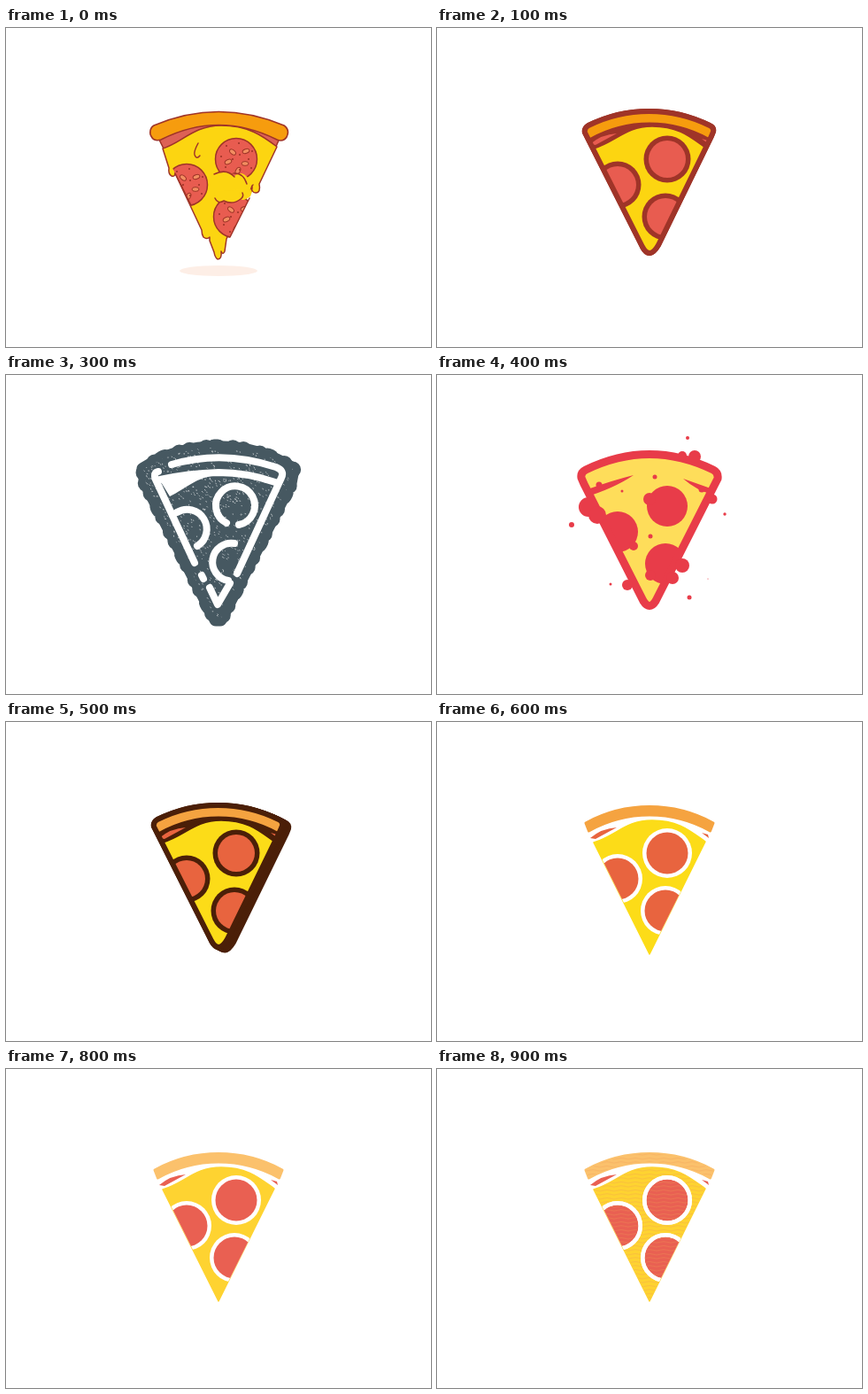
An HTML page for the animation above (1000 ms loop, 480 by 360 pixels).

```html
<!DOCTYPE html>
<html lang="en">
<head>
<meta charset="utf-8">
<title>Pizza slices</title>
<style>
  html, body { margin: 0; width: 100%; height: 100%; overflow: hidden; background: #fff; }
  svg { display: block; width: 100%; height: 100%; }
  .look { opacity: 0; }
</style>
</head>
<body>
<svg id="stage" viewBox="0 0 480 360"></svg>
<script>
const STEP = 100, COUNT = 10;

// Shared geometry
const CRUST = 'M168 114A150 150 0 0 1 312 114L308.5 123A140 140 0 0 0 171.5 123Z';
const CHEESE = 'M177 136C203 128 213 111 243 111S286 123 303 135L240 262Z';
const WEDGE = 'M168 118H312L240 262Z';
const SLIVERS = 'M173 131Q186 120 203 119L179 132ZM299 125L306 127L307 131Z';
const BOLD = 'M169 122L167 118Q166 113 171 110A154 154 0 0 1 308 110Q313 112 312 117L310 122L250 245Q240 262 232 247Z';
const SOFT = 'M166 123L163 116Q162 110 168 107Q240 72 312 107Q318 110 317 117L247 255Q240 266 233 255Z';
const BOARD = 'M170 119Q167 110 175 107Q240 86 305 107Q313 110 310 119L249 241Q240 252 231 241Z';
const STAMP = 'M158 122L155 106A159 159 0 0 1 324 106L321 122L242 276H237Z';
const MEAT = [[260, 148], [204, 177], [258, 213]];

const path = (d, a = '') => `<path d="${d}" ${a}/>`;
const disc = (x, y, r, a = '') => `<circle cx="${x}" cy="${y}" r="${r}" ${a}/>`;
const line = (color, w) => `fill="none" stroke="${color}" stroke-width="${w}" stroke-linecap="round" stroke-linejoin="round"`;
const fill = color => `fill="${color}"`;
const group = (a, ...parts) => `<g ${a}>${parts.join('')}</g>`;
const clip = (id, ...parts) => group(`clip-path="url(#${id})"`, ...parts);
const meats = (r, a) => MEAT.map(([x, y]) => disc(x, y, r, a)).join('');

function random(seed) {
  return () => (seed = (seed * 16807) % 2147483647) / 2147483647;
}

function specks(count, seed, x, y, w, h, size) {
  const rnd = random(seed);
  let d = '';
  for (let i = 0; i < count; i++) {
    d += `M${(x + rnd() * w).toFixed(1)} ${(y + rnd() * h).toFixed(1)}l${(rnd() * size).toFixed(1)} ${(rnd() * size).toFixed(1)}`;
  }
  return d;
}

// Flat slice: crust, cheese and meat parted by a gap colour
function flat({ crust, cheese, meat, gap = '#fff', edge = cheese, r = 23.5, ring = 28 }) {
  return path(CRUST, `fill="${crust}" stroke="${crust}" stroke-width="3" stroke-linejoin="round"`) +
    path(SLIVERS, fill(meat)) +
    path(CHEESE, `fill="${cheese}" stroke="${edge}" stroke-width="1.5" stroke-linejoin="round"`) +
    clip('wedge', meats(ring, fill(gap)), meats(r, fill(meat)));
}

function bold(colors, ink, depth) {
  let back = '';
  for (let i = depth; i >= 0; i--) {
    back += path(BOLD, `fill="${ink}" stroke="${ink}" stroke-width="6" stroke-linejoin="round" transform="translate(${i} ${i * .5})"`);
  }
  return back + clip('bold', flat({ ...colors, gap: ink, edge: ink, r: 21, ring: 26.5 })) + path(BOLD, line(ink, 6));
}

function drippy() {
  const ink = '#9f3428', pen = line(ink, 1.5), red = '#e85c50';
  const oval = (x, y, turn) =>
    `<ellipse cx="${x}" cy="${y}" rx="4" ry="2.4" fill="#f28d60" stroke="${ink}" transform="rotate(${turn} ${x} ${y})"/>`;
  const spots = [[-17, -3], [-11, -15], [3, -18], [14, 0], [-4, 0], [4, 12], [-12, 9], [17, 10], [-5, 17], [4, -5], [18, -9]];
  const topping = ([x, y]) => disc(x, y, 23.5, `fill="${red}" stroke="${ink}" stroke-width="1.5"`) +
    oval(x - 4, y - 8, 40) + oval(x + 11, y - 9, -20) + oval(x + 10, y + 5, 0) +
    oval(x - 9, y + 3, -25) + oval(x + 2, y + 13, -60) +
    spots.map(([a, b]) => disc(x + a, y + b, 1.1, fill(ink))).join('');
  return `<ellipse cx="240" cy="274" rx="44" ry="6" fill="#fdeee6"/>` +
    path('M171 122Q240 88 310 122L304 136H178Z', `fill="#dd6156" stroke="${ink}" stroke-width="1.5"`) +
    path('M177 136C198 130 212 110 243 110S290 122 306 134L286 176Q288 186 282 186Q277 186 278 179L249 238L247 252Q245 257 243 252Q244 261 239 261Q236 259 235 253L230 240V236Q227 239 223 236Q221 233 221 228L191 164Q191 168 187 167Q183 165 184 158Z',
      `fill="#fcd511" stroke="${ink}" stroke-width="1.5" stroke-linejoin="round"`) +
    clip('wedge', MEAT.map(topping).join('')) +
    path('M275 192L253 236M191 164L209 200', pen) +
    path('M236 165Q249 158 258 167Q266 160 273 169L272 180H246Z', fill('#fcd511')) +
    path('M235 165Q249 158 258 168M257 164Q268 163 272 176', pen) +
    path('M235 184L236 193Q239 199 246 195Q256 200 265 193Q268 196 276 190L279 182Z', fill('#fcd511')) +
    path('M236 192Q239 199 246 195Q256 200 265 193Q269 190 267 186', pen) +
    path('M217 130Q212 139 213 143Q215 149 219 144M278 184Q276 179 279 177', pen) +
    path('M167 110Q240 79 314 110Q321 115 317 123Q313 129 306 126Q240 93 175 126Q166 129 163 120Q162 113 167 110Z',
      `fill="#f69c0e" stroke="${ink}" stroke-width="1.6"`);
}

function halftone() {
  const red = '#de5948', yellow = '#fdcd4d', pen = line(red, 4.5), thin = line(red, 3.4);
  const shade = MEAT.map(([x, y]) => disc(x + 4, y + 4, 25, fill('#fff'))).join('');
  const inner = MEAT.map(([x, y]) => disc(x, y, 23.5, fill(yellow)) + disc(x + 2.5, y + 3.5, 21, fill('#fff'))).join('');
  return group('transform="translate(4 5)"', path(CHEESE, fill(yellow))) +
    path(CHEESE, fill(yellow)) +
    shade +
    path(CHEESE, 'fill="url(#dots)"') +
    clip('wedge', inner, meats(24, pen)) +
    path('M168 119Q167 112 174 109Q240 81 306 109Q314 112 312 120L240 266Z', line(red, 4.5)) +
    path('M173 128Q240 90 308 130', pen) +
    path('M176 134Q195 127 212 116M268 114Q290 121 304 133', line(red, 3)) +
    disc(253, 141, 4, thin) + disc(256, 203, 4, thin) +
    path('M268 137L270 146M246 152L255 157M265 158V152H273M203 165Q209 163 210 169M205 178L211 184L217 179M248 214L251 223',
      `fill="none" stroke="${red}" stroke-width="3.6"`) +
    path(specks(65, 71, 168, 94, 145, 36, 2.5), line('#fff', .8)) +
    clip('wedge', path(specks(90, 19, 180, 130, 120, 130, 1.6), line('#fff', .7)));
}

function stamp() {
  const ink = '#465861', pen = line('#fff', 8);
  return path(STAMP, `fill="${ink}" stroke="${ink}" stroke-width="15" stroke-linejoin="round"`) +
    path(STAMP, line(ink, 18.5) + ' stroke-dasharray="0 12 0 19 0 9 4 17"') +
    path('M187 101Q245 84 305 104Q315 108 311 116L261 224', pen) +
    path('M213 212L169 118Q166 110 172 109', pen) +
    path('M174 118Q206 111 240 110Q272 110 304 121', pen) +
    path('M172 116L185 137C204 128 214 115 240 113Z', fill('#fff')) +
    path('M249 167A22 22 0 1 1 263 169M193 155A21 21 0 1 1 216 193M258 190A21 21 0 0 0 251 232', pen) +
    path('M221 226L223 230M230 240L239 259L253 235', pen) +
    clip('stamp', path(specks(1300, 37, 148, 76, 184, 206, 1), line('#fff', .6)));
}

function splat() {
  const red = '#e83c49';
  const drops = [[283, 71, 2], [291, 92, 7], [277, 91, 5], [171, 149, 11], [181, 158, 10], [152, 169, 3],
    [325, 157, 1.7], [311, 140, 5.5], [285, 251, 2.5], [215, 237, 6], [196, 236, 1.5], [306, 230, .6],
    [246, 115, 2.5], [241, 182, 2.5], [209, 131, 1.5], [183, 124, 3.5], [299, 129, 3.5],
    [240, 140, 7], [222, 193, 5], [277, 215, 8], [241, 226, 6], [266, 229, 7]];
  return path(SOFT, fill('#fedd5a')) +
    clip('soft', meats(23, fill(red)), path('M164 139L170 129Q198 119 222 113Q200 128 164 139ZM278 117L312 129V135Q294 131 278 117Z', fill(red))) +
    path(SOFT, line(red, 9)) +
    drops.map(([x, y, r]) => disc(x, y, r, fill(red))).join('');
}

function board() {
  const pink = '#f65ca5';
  const band = 'M180 92L296 178';
  return clip('board',
    path(BOARD, fill('#d21358')),
    path(BOARD, 'fill="url(#grain)"'),
    path('M160 127Q240 85 320 127V80H160Z', fill('#f8e272')),
    path('M165 130Q240 91 315 130', line('#fff', 5)),
    path(band, line('#fff', 27)),
    path(band, line(pink, 18)),
    path('M223 136L238 172L235 189L221 232', 'fill="none" stroke="#0d8643" stroke-width="7"'),
    MEAT.slice(1).map(([x, y]) => disc(x, y, 21, 'fill="#f13c42" stroke="#fff" stroke-width="5"')).join('')) +
    path(BOARD, line(pink, 4)) +
    disc(260, 149, 25, fill('#0c7b40')) +
    disc(261, 149, 20, fill('#14bf74')) +
    path('M243 144L274 136M242 154L281 144M246 162L279 154M250 132L257 167M264 130L271 165', line('#0c7b40', 1.6)) +
    '<rect x="243" y="144" width="33" height="11" rx="1" fill="#f773ad" transform="rotate(43 259.5 149.5)"/>';
}

const warm = { crust: '#f69c0e', cheese: '#fcd511', meat: '#e85c50' };
const deep = { crust: '#f5a340', cheese: '#fcdc18', meat: '#e8643f' };
const light = { crust: '#fbc16c', cheese: '#fed331', meat: '#e96052' };

function waves() {
  return flat(light) +
    path(CRUST, 'fill="url(#waves)"') +
    clip('cheese', '<rect x="160" y="100" width="160" height="165" fill="url(#waves)"/>',
      MEAT.map(([x, y]) => disc(x, y, 25.75, line('#fff', 4.5))).join(''));
}

const clipDef = (id, d) => `<clipPath id="${id}">${path(d)}</clipPath>`;
const tile = (id, w, h, body, turn = 0) =>
  `<pattern id="${id}" width="${w}" height="${h}" patternUnits="userSpaceOnUse" patternTransform="rotate(${turn})">${body}</pattern>`;

const defs = '<defs>' +
  clipDef('wedge', WEDGE) + clipDef('cheese', CHEESE) + clipDef('bold', BOLD) +
  clipDef('soft', SOFT) + clipDef('board', BOARD) + clipDef('stamp', STAMP) +
  tile('dots', 7, 7, disc(1.75, 1.75, 1.15, fill('#de5948')) + disc(5.25, 5.25, 1.15, fill('#de5948'))) +
  tile('grain', 5, 5, path('M0 1H5', line('#b10d4a', 1.4)), -28) +
  tile('waves', 16, 4.5, path('M-4 2Q0 .5 4 2T12 2T20 2', line('#f19a55', .7) + ' opacity=".55"')) +
  '</defs>';

const looks = [
  drippy(),
  bold(warm, '#9f3428', 0),
  halftone(),
  stamp(),
  splat(),
  bold(deep, '#4b1f08', 7),
  flat(deep),
  board(),
  flat(light),
  waves()
];

const stage = document.getElementById('stage');
stage.innerHTML = defs + looks.map(body => group('class="look"', body)).join('');

const total = STEP * COUNT;
stage.querySelectorAll('.look').forEach((look, i) => {
  look.animate([
    { opacity: 1, offset: 0, easing: 'step-end' },
    { opacity: 0, offset: 1 / COUNT },
    { opacity: 0, offset: 1 }
  ], { duration: total, delay: i * STEP - total, iterations: Infinity });
});
</script>
</body>
</html>
```
